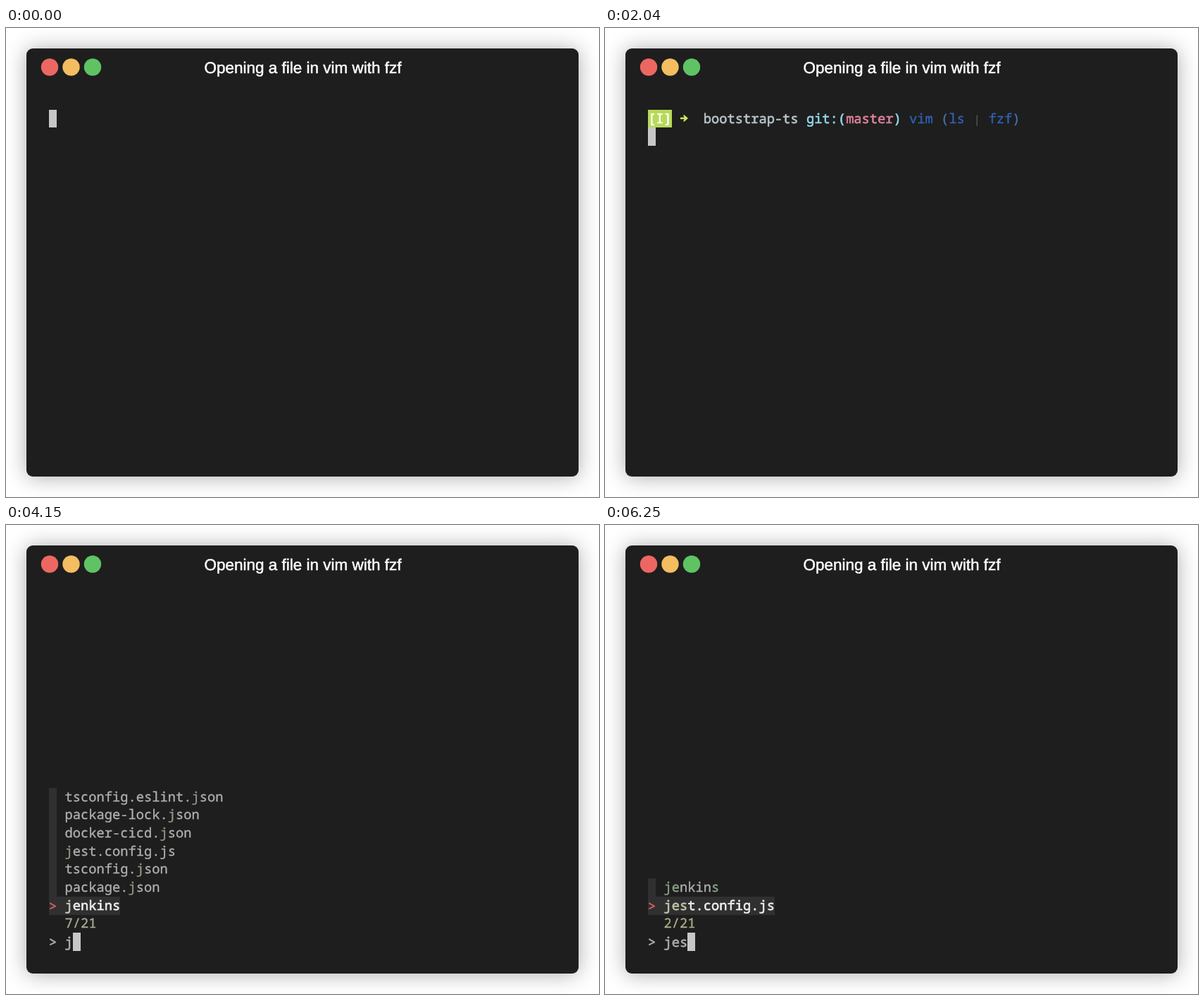
Animation, 842 px wide and 665 px high, one loop 7990 ms. Source, as an HTML page:

```html
<!DOCTYPE html>
<html lang="en">
<head>
<meta charset="utf-8">
<title>Terminal</title>
<style>
  html, body { margin: 0; width: 100%; height: 100%; overflow: hidden; background: #fff; }
  #window {
    position: absolute; left: 29px; top: 29px; width: 784px; height: 607px;
    border-radius: 9px; background: #1e1e1e; box-shadow: 0 1px 30px rgba(0, 0, 0, .33);
  }
  svg { position: absolute; left: 0; top: 0; display: block; }
  text { white-space: pre; text-rendering: geometricPrecision; }
  .mono { font: 18.74px "Noto Sans Mono", "DejaVu Sans Mono", monospace; }
  .title { font: 22.5px "Liberation Sans", Arial, sans-serif; fill: #fff; stroke: #fff; stroke-width: .5px; }
</style>
</head>
<body>
<div id="window"></div>
<svg id="stage" width="842" height="665" viewBox="0 0 842 665">
  <circle cx="62" cy="55.5" r="12.2" fill="#ec6761"/>
  <circle cx="92.5" cy="55.5" r="12.2" fill="#f4bd60"/>
  <circle cx="123" cy="55.5" r="12.2" fill="#5fc363"/>
  <text class="title" x="421.5" y="64" text-anchor="middle">Opening a file in vim with fzf</text>
</svg>
<script>
const LOOP = 7990;
const LEFT = 61, TOP = 115.7, CELL = 11.245, ROW = 25.7;
const BASE = 18.8, PROMPT_BASE = 19.7;
const LAST_ROW = 18;
const REGULAR = .35, BOLD = .65;
const GRAY = '#b0b0b0', BAR = '#303030';
const stage = document.getElementById('stage');

const colX = col => LEFT + col * CELL;
const rowY = row => TOP + row * ROW;

function add(parent, tag, attrs, content) {
  const el = document.createElementNS('http://www.w3.org/2000/svg', tag);
  for (const key in attrs) el.setAttribute(key, attrs[key]);
  if (content !== undefined) el.textContent = content;
  parent.appendChild(el);
  return el;
}

function write(g, col, row, text, fill, weight = REGULAR, base = BASE) {
  return add(g, 'text', {
    class: 'mono', x: colX(col), y: rowY(row) + base,
    fill, stroke: fill, 'stroke-width': weight
  }, text);
}

const prompt = (g, col, row, text, fill) => write(g, col, row, text, fill, BOLD, PROMPT_BASE);

function block(g, col, row, cols, fill, rows = 1) {
  const y = Math.round(rowY(row));
  add(g, 'rect', {
    x: Math.round(colX(col)), y, fill,
    width: Math.round(colX(col + cols)) - Math.round(colX(col)),
    height: Math.round(rowY(row + rows)) - y
  });
}

const cursor = (g, col, row) => block(g, col, row, 1, '#c7c7c7');

function commandLine(g, parens, pipe) {
  block(g, 0, 0, 3, '#b7da58');
  prompt(g, 0, 0, '[I]', '#fff');
  add(g, 'path', {
    d: 'M107 126.8H112.5L111 123.6H112.8L118 128L112.8 132.4H111L112.5 129.2H107Z',
    fill: '#d0e55f'
  });
  prompt(g, 7, 0, 'bootstrap-ts', '#b9c5ca');
  prompt(g, 20, 0, 'git:(', '#94d9ec');
  prompt(g, 25, 0, 'master', '#df819b');
  prompt(g, 31, 0, ')', '#94d9ec');
  write(g, 33, 0, 'vim', '#3261b6');
  write(g, 37, 0, '(', parens);
  write(g, 38, 0, 'ls', '#3261b6');
  const bar = write(g, 41.15, 0, '|', pipe);
  bar.style.fontSize = '15px';
  write(g, 43, 0, 'fzf', '#3261b6');
  write(g, 46, 0, ')', parens);
}

// Colours the letters of the query in order of appearance.
function matchedText(g, row, text, query, fill, hit, weight) {
  const line = write(g, 2, row, '', fill, weight);
  let next = 0;
  for (const ch of text) {
    const color = next < query.length && ch === query[next] ? hit : fill;
    if (color === hit) next++;
    add(line, 'tspan', { fill: color, stroke: color }, ch);
  }
}

// Files are listed upwards from the prompt; the last one is selected.
function finder(g, files, query, count, look) {
  const selected = LAST_ROW - 2;
  const first = selected - files.length + 1;
  block(g, 0, first, 1, BAR, files.length - 1);
  block(g, 0, selected, 2 + files[files.length - 1].length, BAR);
  files.forEach((name, i) => {
    const active = first + i === selected;
    matchedText(g, first + i, name, query,
      active ? '#f0f0f0' : GRAY, active ? look.active : look.hit, active ? BOLD : REGULAR);
  });
  prompt(g, 0, selected, '>', '#d0605f');
  write(g, 2, LAST_ROW - 1, count + '/21', look.count);
  prompt(g, 0, LAST_ROW, '>', GRAY);
  prompt(g, 2, LAST_ROW, query, GRAY);
  cursor(g, 2 + query.length, LAST_ROW);
}

const allFiles = [
  ...['533957', '456673', '388573', '325629'].map(n => `render1601675${n}.gif`),
  'package.json', 'package-lock.json', 'node_modules', 'jest.config.js', 'jenkins',
  'fzf-use-2.yml', 'fzf-use-1.yml', 'docker-compose.yaml', 'docker-cicd.json',
  'bootstrap-ts.iml', 'VERSION', 'README.md', 'Dockerfile'
];
const jFiles = [
  'tsconfig.eslint.json', 'package-lock.json', 'docker-cicd.json', 'jest.config.js',
  'tsconfig.json', 'package.json', 'jenkins'
];

const scenes = [
  [0, g => cursor(g, 0, 0)],
  [40, g => { commandLine(g, '#4a80ab', '#3f6935'); cursor(g, 47, 0); }],
  [2040, g => { commandLine(g, '#4b70ac', '#555555'); cursor(g, 0, 1); }],
  [2070, g => finder(g, allFiles, '', 21, { count: '#a9ae8c' })],
  [4150, g => finder(g, jFiles, 'j', 7, { hit: '#929784', active: '#c8cfbd', count: '#a9ab91' })],
  [4250, g => finder(g, ['jest.config.js', 'jenkins'], 'je', 2,
    { hit: '#8fa587', active: '#b3c3a4', count: '#aaa486' })],
  [6250, g => finder(g, ['jenkins', 'jest.config.js'], 'jes', 2,
    { hit: '#8ca68e', active: '#c2cba8', count: '#adab88' })]
].map(([start, draw]) => {
  const group = add(stage, 'g', { display: 'none' });
  draw(group);
  return { start, group };
});

let shown = null;
function render(time) {
  const t = time % LOOP;
  const { group } = scenes.filter(s => s.start <= t).pop();
  if (group === shown) return;
  if (shown) shown.setAttribute('display', 'none');
  group.removeAttribute('display');
  shown = group;
}

const begin = performance.now();
function tick() {
  render(Math.max(0, performance.now() - begin));
  requestAnimationFrame(tick);
}
tick();
</script>
</body>
</html>
```
